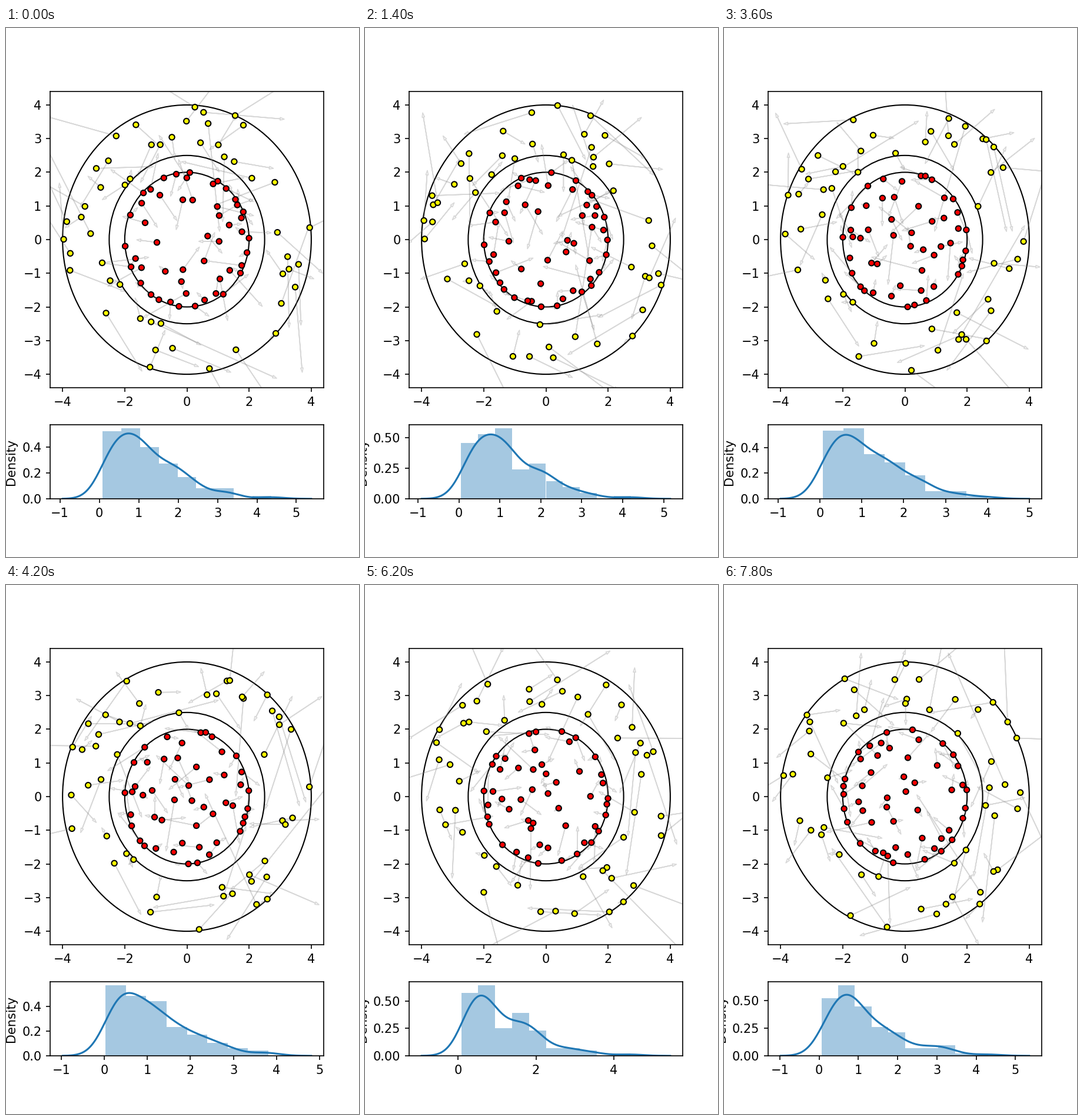
A matplotlib script that plays this animation: 600x900 px, repeating every 8 s.

```python
import numpy as np
import matplotlib.pyplot as plt
from matplotlib.animation import FuncAnimation
from matplotlib.collections import PolyCollection

FRAMES, INTERVAL = 40, 200
STEP, SUBSTEPS = 0.05, 10
LIMIT = 4.4
CORE, RING_IN, RING_OUT = 2.0, 2.5, 4.0
COUNT = 50
CHARGE = 0.15


def scatter_in(rng, inner, outer):
    """Random places spread evenly over the area between two radii."""
    radius = np.sqrt(rng.uniform(inner ** 2, outer ** 2, COUNT))
    angle = rng.uniform(0, 2 * np.pi, COUNT)
    return np.column_stack([radius * np.cos(angle), radius * np.sin(angle)])


def repulsion(pos):
    gap = pos[:, None] - pos[None]
    dist2 = (gap ** 2).sum(-1) + 0.002
    return CHARGE * (gap / dist2[..., None] ** 1.5).sum(1)


def bounce(pos, vel, radius, side):
    """Mirror velocities at a round wall; side is 1 outside, -1 inside."""
    dist = np.hypot(*pos.T)
    normal = pos / dist[:, None]
    hit = side * (dist - radius) > 0
    pos[hit] = normal[hit] * radius
    speed = (vel * normal).sum(1)
    turn = hit & (side * speed > 0)
    vel[turn] -= 2 * speed[turn, None] * normal[turn]


def advance(pos, vel, inner, outer, damping=1.0):
    dt = STEP / SUBSTEPS
    for _ in range(SUBSTEPS):
        vel += repulsion(pos) * dt
        vel *= damping
        pos += vel * dt
        bounce(pos, vel, outer, 1)
        if inner:
            bounce(pos, vel, inner, -1)


def set_heat(vel, rms):
    vel *= rms / np.sqrt((vel ** 2).sum(1).mean())


def simulate(seed, inner, outer, rms):
    """Settle the charges, warm them up, then record one loop."""
    rng = np.random.default_rng(seed)
    pos = scatter_in(rng, inner, outer)
    vel = np.zeros_like(pos)
    for _ in range(60):
        advance(pos, vel, inner, outer, damping=0.97)
    vel[:] = rng.normal(size=vel.shape)
    for _ in range(30):
        set_heat(vel, rms)
        advance(pos, vel, inner, outer)
    set_heat(vel, rms)

    states = []
    for _ in range(FRAMES):
        states.append((pos.copy(), vel.copy()))
        advance(pos, vel, inner, outer)
    return states


def arrow_shapes(pos, vel):
    unit = vel / np.hypot(*vel.T)[:, None]
    side = np.column_stack([-unit[:, 1], unit[:, 0]]) * 0.04
    tip = pos + vel
    base = tip - unit * 0.13
    return np.stack([pos, base, base + side, tip, base - side, base], axis=1)


def draw_density(speeds):
    n = len(speeds)
    low, high = speeds.min(), speeds.max()
    q1, q3 = np.percentile(speeds, [25, 75])
    width = 2 * (q3 - q1) / n ** (1 / 3)
    bins = int(np.ceil((high - low) / width))

    bw = speeds.std(ddof=1) * n ** -0.2
    grid = np.linspace(low - 3 * bw, high + 3 * bw, 200)
    bells = np.exp(-0.5 * ((grid[:, None] - speeds) / bw) ** 2)
    curve = bells.sum(1) / (n * bw * np.sqrt(2 * np.pi))

    lower.clear()
    lower.hist(speeds, bins=bins, density=True, color="C0", alpha=0.4)
    lower.plot(grid, curve, color="C0")
    lower.set_ylim(bottom=0)
    lower.set_ylabel("Density")


def update(i):
    pos, vel = (np.vstack(pair) for pair in zip(red[i], yellow[i]))
    dots.set_offsets(pos)
    arrows.set_verts(arrow_shapes(pos, vel))
    draw_density(np.hypot(*vel.T))
    return dots, arrows


red = simulate(3, 0, CORE, rms=0.82)
yellow = simulate(8, RING_IN, RING_OUT, rms=1.9)

fig, (upper, lower) = plt.subplots(
    2, 1, figsize=(4, 6), dpi=150, gridspec_kw={"height_ratios": [4, 1]})
upper.set(xlim=(-LIMIT, LIMIT), ylim=(-LIMIT, LIMIT),
          xticks=range(-4, 5, 2), yticks=range(-4, 5))
for radius in (CORE, RING_IN, RING_OUT):
    upper.add_patch(plt.Circle((0, 0), radius, fill=False, lw=1))
arrows = PolyCollection([], facecolors="none", lw=0.8, zorder=2,
                        edgecolors=(0.5, 0.5, 0.5, 0.3), joinstyle="round")
upper.add_collection(arrows, autolim=False)
dots = upper.scatter(np.zeros(2 * COUNT), np.zeros(2 * COUNT), s=20, lw=1,
                     c=["red"] * COUNT + ["yellow"] * COUNT,
                     edgecolors="black", zorder=3)

anim = FuncAnimation(fig, update, frames=FRAMES, interval=INTERVAL,
                     init_func=lambda: update(0), repeat=True, repeat_delay=0)
plt.show()
```
